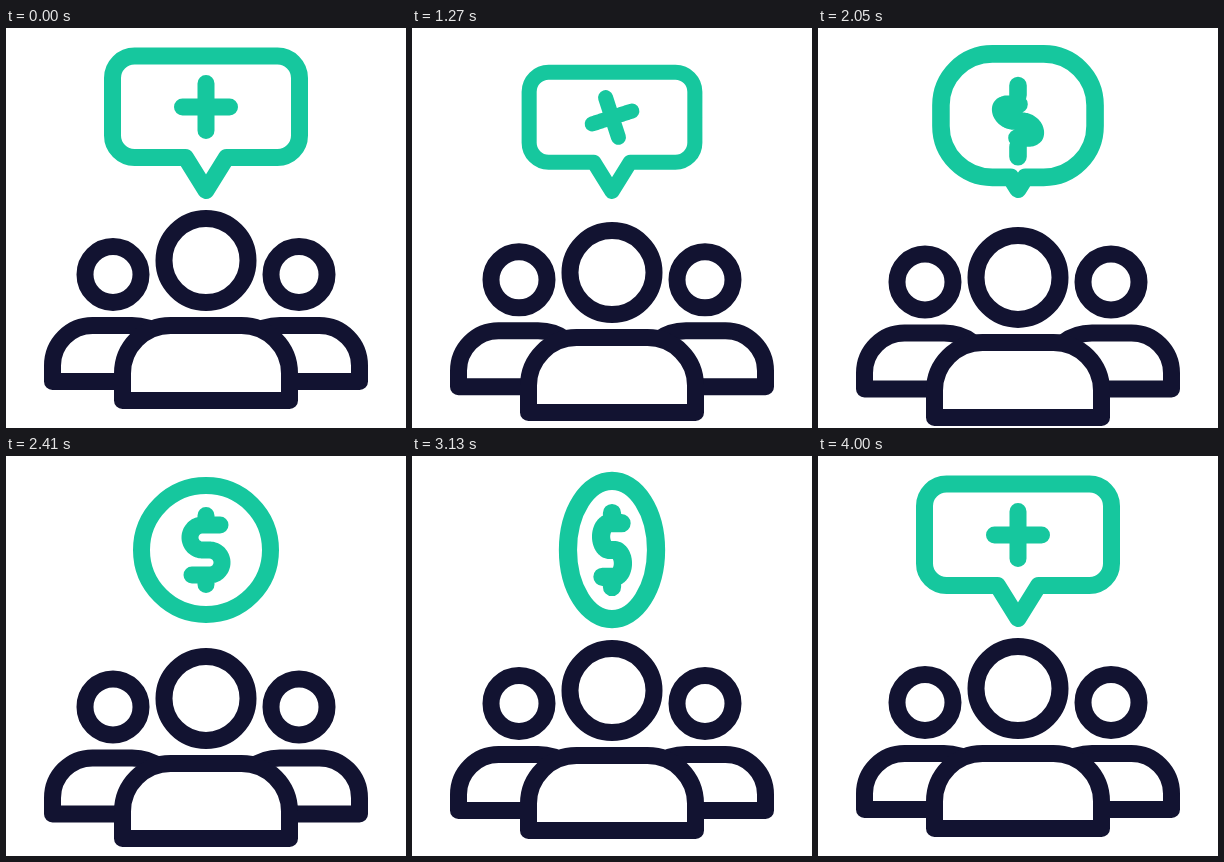
Animation, 400 px wide and 400 px high, one loop 4.03 s. Source, as an HTML page with a canvas:

```html
<!DOCTYPE html>
<html lang="en">
<head>
<meta charset="utf-8">
<title>Group message to coin</title>
<style>
html, body { margin: 0; height: 100%; overflow: hidden; background: #fff; }
canvas { display: block; width: 400px; height: 400px; }
</style>
</head>
<body>
<canvas></canvas>
<script>
const LOOP = 4030, LINE = 17, NAVY = '#121331', GREEN = '#16c79e';
const canvas = document.querySelector('canvas');
const ctx = canvas.getContext('2d');
const dpr = window.devicePixelRatio || 1;
canvas.width = canvas.height = 400 * dpr;

const mix = (a, b, k) => a + (b - a) * k;
const mixPoint = (a, b, k) => [mix(a[0], b[0], k), mix(a[1], b[1], k)];
const phase = (t, from, to) => Math.min(1, Math.max(0, (t - from) / (to - from)));
const smooth = s => s * s * (3 - 2 * s);
const ease = (t, from, to) => smooth(phase(t, from, to));

// Smooth interpolation through [time, value] keys
function track(t, keys) {
  let value = keys[0][1];
  for (let i = 1; i < keys.length; i++) {
    value += (keys[i][1] - keys[i - 1][1]) * ease(t, keys[i - 1][0], keys[i][0]);
  }
  return value;
}

// Cubic bezier easing with handles (x1, 0) and (x2, 1)
function bezier(x, x1, x2) {
  let lo = 0, hi = 1;
  for (let i = 0; i < 24; i++) {
    const s = (lo + hi) / 2, r = 1 - s;
    if (3 * x1 * s * r * r + 3 * x2 * s * s * r + s * s * s < x) lo = s; else hi = s;
  }
  return smooth(lo);
}

// Upper half of the S, each point paired with one on the plus's bar
const curl = [];
for (let i = 0; i <= 40; i++) {
  const d = i / 40 * 60.3, a = (d - 3.5) / 12.5;
  const s = d < 3.5 ? [-d, 0]
    : a < Math.PI ? [-3.5 - 12.5 * Math.sin(a), -12.5 + 12.5 * Math.cos(a)]
    : [d - 46.3, -25];
  curl.push([[-23.5 * Math.min(1, d / 33), 0], s]);
}

function trace(points) {
  points.forEach(([x, y], i) => i ? ctx.lineTo(x, y) : ctx.moveTo(x, y));
}

// Speech bubble at k = 0, ring at k = 1
function bubble(k) {
  const top = mix(28, 29.5, k), bottom = mix(129.5, 158.5, k);
  const r = mix(22, 64.5, k), x = mix(71.5, 0, k), notch = mix(20.5, 0, k);
  const q = Math.PI / 2;
  ctx.moveTo(0, mix(162.5, 158.5, k));
  ctx.lineTo(notch, bottom);
  ctx.arc(x, bottom - r, r, q, 0, true);
  ctx.arc(x, top + r, r, 0, -q, true);
  ctx.arc(-x, top + r, r, -q, -2 * q, true);
  ctx.arc(-x, bottom - r, r, 2 * q, q, true);
  ctx.lineTo(-notch, bottom);
  ctx.closePath();
}

function circle(x, y, r) {
  ctx.beginPath();
  ctx.arc(x, y, r, 0, 7);
  ctx.stroke();
}

const shoulder = new Path2D('M118 353.5H46.5V337.5a40 40 0 0 1 40-40H126c11 0 20 3 28 9');
const torso = new Path2D('M116.5 372.5V345.5a48 48 0 0 1 48-48h71a48 48 0 0 1 48 48v27z');

function sidePerson(flip, dy) {
  ctx.save();
  if (flip) { ctx.translate(400, 0); ctx.scale(-1, 1); }
  ctx.translate(0, dy);
  circle(107, 246.5, 28);
  ctx.lineCap = 'butt';
  ctx.stroke(shoulder);
  ctx.restore();
}

function people(t) {
  const drop = t < 1500 ? ease(t, 1000, 1500) : 1 - bezier(phase(t, 1500, 4000), 0.33, 0.26);
  ctx.strokeStyle = NAVY;
  ctx.lineWidth = LINE;
  sidePerson(false, 9.5 * drop);
  sidePerson(true, 9.5 * drop);
  ctx.save();
  ctx.translate(0, 21.5 * drop);
  circle(200, 232.5, 42);
  ctx.fillStyle = '#fff';
  ctx.fill(torso);
  ctx.stroke(torso);
  ctx.restore();
}

function sign(t) {
  const turn = Math.PI * ease(t, 2660, 4010);
  const flipped = turn > Math.PI / 2;
  const ring = flipped ? 0 : ease(t, 1550, 2380);
  const glyph = flipped ? 0 : ease(t, 1500, 2060);
  const size = track(t, [[1000, 1], [1250, 0.885], [1700, 1.066], [2410, 1], [2850, 1.12], [3500, 1]]);
  const tilt = track(t, [[1000, 0], [1260, -18], [1720, 0]]);
  const anchor = mix(171, 94, ring);

  ctx.save();
  // The turn narrows the shapes but not their line weight
  const base = ctx.getTransform();
  ctx.translate(200, anchor);
  ctx.scale(size * Math.abs(Math.cos(turn)), size);
  ctx.translate(0, -anchor);

  ctx.beginPath();
  bubble(ring);

  ctx.translate(0, mix(79, 94, glyph));
  ctx.rotate(tilt * Math.PI / 180);
  const upper = curl.map(([a, b]) => mixPoint(a, b, ring));
  trace([...upper.slice().reverse(), ...upper.map(([x, y]) => [-x, -y])]);
  for (const side of [-1, 1]) {
    trace([[0, side * mix(23.5, 34.5, glyph)], [0, side * 25 * glyph]]);
  }

  ctx.setTransform(base);
  ctx.strokeStyle = GREEN;
  ctx.lineWidth = LINE * size;
  ctx.stroke();
  ctx.restore();
}

const begin = performance.now();
function draw() {
  const t = (performance.now() - begin) % LOOP;
  ctx.setTransform(dpr, 0, 0, dpr, 0, 0);
  ctx.lineCap = ctx.lineJoin = 'round';
  ctx.fillStyle = '#fff';
  ctx.fillRect(0, 0, 400, 400);
  people(t);
  sign(t);
  requestAnimationFrame(draw);
}
draw();
</script>
</body>
</html>
```
